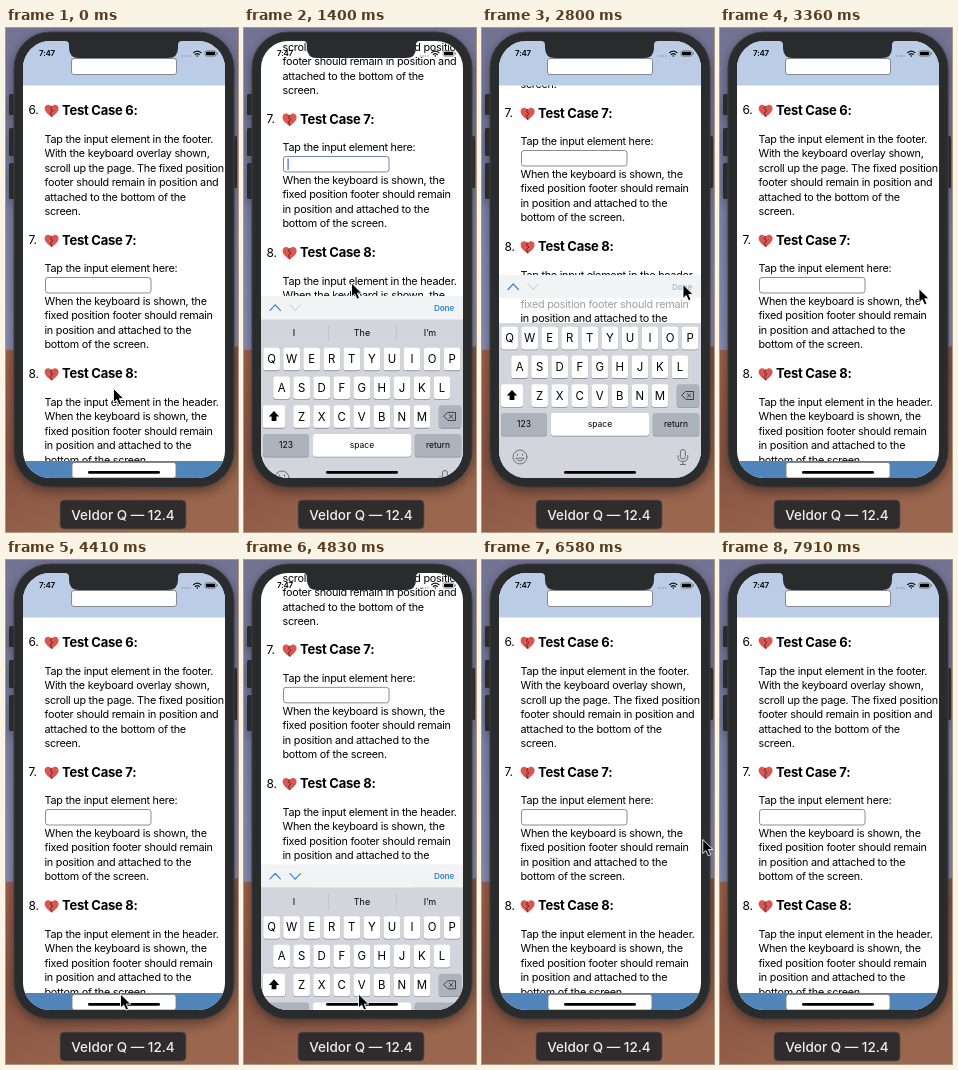
An HTML page for the animation above (7980 ms loop, 232 by 504 pixels).

```html
<!DOCTYPE html>
<html lang="en">
<head>
<meta charset="utf-8">
<title>Fixed footer test</title>
<style>
  html, body { margin: 0; width: 100%; height: 100%; overflow: hidden; background: #7d6f85; }
  svg { display: block; width: 232px; height: 504px; }
  text { font-family: Inter, Roboto, Arial, sans-serif; fill: #000; white-space: pre; }
  .body { font-size: 10.8px; letter-spacing: -.25px; }
  .num { font-size: 12px; letter-spacing: -.2px; }
  .head { font-size: 13px; font-weight: 700; letter-spacing: -.25px; }
  .field { fill: #fff; stroke: #7d8086; stroke-width: .9; }
  .mid { text-anchor: middle; }
  .key { font-size: 11.4px; }
  .small { font-size: 8.5px; }
  .line { fill: none; stroke-width: 1.2; stroke-linecap: round; stroke-linejoin: round; }
  .phone { fill: #2a2b2d; }
  #body { filter: drop-shadow(0 4px 6px rgba(0, 0, 0, .4)); }
</style>
</head>
<body>
<svg id="stage" viewBox="0 0 232 504" xmlns="http://www.w3.org/2000/svg">
  <defs>
    <linearGradient id="sky" x2="0" y2="1">
      <stop offset="0" stop-color="#737393"/>
      <stop offset=".4" stop-color="#8186ab"/>
      <stop offset="1" stop-color="#9296b6"/>
    </linearGradient>
    <linearGradient id="dune" x2=".5" y2="1">
      <stop offset="0" stop-color="#9c614b"/>
      <stop offset=".5" stop-color="#875342"/>
      <stop offset="1" stop-color="#9a664e"/>
    </linearGradient>
    <clipPath id="screen"><rect x="17" y="13" width="202" height="437" rx="27"/></clipPath>
    <g id="heart">
      <path d="M6.6 2.4C4.8-.4 0 .2 0 4.2 0 8 4 10.8 7 13 10 10.8 14 8 14 4.2 14 .2 9.2-.4 7.4 2.4Z" fill="#dd5550"/>
      <path class="line" d="M7 2.2L5.8 4.8 8.4 6.6 5.8 8.8 7.2 12.4" stroke="#5c2a2b" style="stroke-width:1"/>
    </g>
  </defs>

  <rect width="232" height="504" fill="url(#sky)"/>
  <path d="M0 322Q20 320 60 334T232 318V504H0Z" fill="url(#dune)"/>

  <g id="body" class="phone">
    <rect x="3" y="66" width="7" height="21" rx="1.5"/>
    <rect x="3" y="100" width="7" height="28" rx="1.5"/>
    <rect x="3" y="135" width="7" height="36" rx="1.5"/>
    <rect x="226" y="108" width="5" height="52" rx="1.5"/>
    <rect x="8" y="4" width="220" height="455" rx="36" stroke="#3d3f42"/>
  </g>

  <g clip-path="url(#screen)">
    <rect x="17" y="13" width="202" height="437" fill="#fff"/>
    <g id="page"></g>
    <g id="fixed">
      <rect x="17" y="0" width="202" height="57.5" fill="#bacce6"/>
      <rect class="field" x="65.5" y="30.5" width="105" height="16" rx="2.5"/>
      <rect x="17" y="433" width="202" height="18" fill="#4f85bb"/>
      <rect class="field" x="66" y="434.5" width="104" height="15.5" rx="2.5"/>
      <rect id="footCaret" x="69.5" y="437" width="1.2" height="11" fill="#4169d8"/>
    </g>
    <g id="board"></g>
    <g id="status">
      <text x="33" y="28" font-size="8" font-weight="600" letter-spacing="-.2">7:47</text>
      <g fill="#8b8f97">
        <circle cx="176.5" cy="28" r=".7"/><circle cx="179" cy="28" r=".7"/>
        <circle cx="181.5" cy="28" r=".7"/><circle cx="184" cy="28" r=".7"/>
      </g>
      <path class="line" stroke="#111" d="M187.6 24.7Q191.3 21.6 195 24.7M189.3 26.5Q191.3 24.9 193.3 26.5"/>
      <circle cx="191.3" cy="28" r=".8"/>
      <rect x="199" y="22.8" width="11" height="5.4" rx="1.6" fill="none" stroke="#555" stroke-width=".6"/>
      <rect x="200" y="23.8" width="9" height="3.4" rx=".8"/>
      <rect x="210.7" y="24.5" width=".9" height="2" fill="#555"/>
    </g>
    <path class="phone" d="M59 13Q63 13 63 17V20Q63 30 73 30H162Q172 30 172 20V17Q172 13 176 13Z"/>
    <rect x="82" y="443" width="72" height="2.8" rx="1.4"/>
  </g>

  <rect x="54" y="472" width="126" height="29" rx="4" fill="#302c2d" stroke="#5a5252" stroke-width=".8"/>
  <text class="mid" x="117" y="491.5" font-size="13.5" font-weight="500" style="fill:#eee">Veldor Q — 12.4</text>
  <path id="cursor" d="M0 0V14L3.2 11 5.5 16.2 8 15.1 5.8 10.1H10.2Z" stroke="#fff" stroke-width=".9"/>
</svg>

<script>
const LOOP = 7980, STEP = 70, BOARD_H = 204;
const $ = id => document.getElementById(id);

function add(parent, tag, attrs, label) {
  const el = document.createElementNS("http://www.w3.org/2000/svg", tag);
  for (const name in attrs) el.setAttribute(name, attrs[name]);
  if (label) el.textContent = label;
  parent.appendChild(el);
  return el;
}

// Page content
const page = $("page");
const remain = [
  "When the keyboard is shown, the", "fixed position footer should remain",
  "in position and attached to the", "bottom of the screen."
];

function paragraph(y, lines) {
  lines.forEach((line, i) =>
    add(page, "text", { class: "body", x: 38.5, y: y + 3.8 + i * 14.48 }, line));
}

[[6, 82], [7, 212], [8, 345.5]].forEach(([n, y]) => {
  add(page, "text", { class: "num", x: 22.5, y: y + 4.4 }, n + ".");
  add(page, "use", { href: "#heart", transform: `translate(38.6 ${y - 6})` });
  add(page, "text", { class: "head", x: 56, y: y + 4.6 }, `Test Case ${n}:`);
});
paragraph(111, [
  "Tap the input element in the footer.", "With the keyboard overlay shown,",
  "scroll up the page. The fixed position", "footer should remain in position and",
  "attached to the bottom of the", "screen."
]);
paragraph(240, ["Tap the input element here:"]);
const input = add(page, "rect", { class: "field", x: 39.5, y: 249.5, width: 105.5, height: 15.5, rx: 2.5 });
const caret = add(page, "rect", { x: 43.5, y: 251.5, width: 1.2, height: 11.5, fill: "#4169d8" });
paragraph(273, remain);
paragraph(374, ["Tap the input element in the header.", ...remain]);

// Keyboard, drawn in its raised position
const board = $("board");
const blue = "#3583d6", grey = "#adb3bd";

function key(cx, cy, w, label, fill = "#fff", cls = "key") {
  const box = { x: cx - w / 2, y: cy - 11.2, width: w, height: 22.6, rx: 2.7 };
  add(board, "rect", { ...box, y: box.y + .8, fill: "#8b8e94" });
  add(board, "rect", { ...box, fill });
  if (label) add(board, "text", { class: "mid " + cls, x: cx, y: cy + (cls === "key" ? 4.1 : 3.1) }, label);
}

add(board, "rect", { x: 17, y: 247, width: 202, height: 23.5, fill: "#f2f3f5" });
add(board, "path", { class: "line", d: "M26 261.5L31.2 256 36.4 261.5", stroke: blue });
const next = add(board, "path", { class: "line", d: "M46 256.2L51.2 261.7 56.4 256.2" });
const done = add(board, "text", { x: 190, y: 262, "font-size": 8.2, "font-weight": 600, style: `fill:${blue}`, "letter-spacing": -.15 }, "Done");

const veil = add(board, "rect", { x: 17, y: 270.5, width: 202, height: 12.5, fill: "#fff", opacity: .62 });
const predict = add(board, "g", {});
add(predict, "rect", { x: 17, y: 270.5, width: 202, height: 25, fill: "#d2d5db" });
[["I", 50], ["The", 118], ["I’m", 186]].forEach(([word, x]) =>
  add(predict, "text", { class: "mid", "font-size": 9, x, y: 287.5 }, word));
[84, 152].forEach(x => add(predict, "rect", { x, y: 276, width: .6, height: 16, fill: "#b9bdc5" }));

add(board, "rect", { x: 17, y: 295, width: 202, height: 156, fill: "#d2d5db" });
[["QWERTYUIOP", 27.6, 310], ["ASDFGHJKL", 37.6, 338.7], ["ZXCVBNM", 57.6, 367.5]].forEach(
  ([row, x, y]) => [...row].forEach((c, i) => key(x + i * 20.05, y, 16.7, c)));
key(30, 367.5, 22.5);
add(board, "path", { d: "M30 362L35.2 367.6H32.4V372H27.6V367.6H24.8Z" });
key(206, 367.5, 22.5, "", grey);
add(board, "path", { class: "line", d: "M204 363.5H211.5V371.5H204L200 367.5ZM205.3 365.7L208.9 369.3M208.9 365.7L205.3 369.3", stroke: "#222", style: "stroke-width:.8" });
key(42, 396.3, 46, "123", grey, "small");
key(118, 396.3, 98, "space", "#fff", "small");
key(194, 396.3, 46.5, "return", grey, "small");

const icon = { class: "line", stroke: "#6b7077", style: "stroke-width:1" };
add(board, "circle", { ...icon, cx: 38, cy: 429, r: 7 });
add(board, "path", { ...icon, d: "M35.5 426V427.4M40.5 426V427.4M34 430.5Q38 436 42 430.5Z" });
add(board, "rect", { ...icon, x: 198.4, y: 421.5, width: 5, height: 9.5, rx: 2.5 });
add(board, "path", { ...icon, d: "M196 427.5V429Q196 433.4 200.9 433.4T205.8 429V427.5M200.9 433.4V436.5M198.4 436.5H203.4" });

// Motion
const easeOut = p => 1 - (1 - p) ** 2;
const easeInOut = p => p * p * (3 - 2 * p);

function track(keys, t, ease) {
  let i = 0;
  while (i < keys.length - 1 && t >= keys[i + 1][0]) i++;
  const a = keys[i], b = keys[i + 1];
  if (!b || t <= a[0]) return a.slice(1);
  const p = ease((t - a[0]) / (b[0] - a[0]));
  return a.slice(1).map((v, n) => v + (b[n + 1] - v) * p);
}

const scrollKeys = [
  [0, 0], [1190, 0], [1458, -127], [2800, -127], [3150, 0],
  [4690, 0], [5072, -204], [5810, -204], [6160, 0]
];
const boardKeys = [
  [0, BOARD_H], [1190, BOARD_H], [1499, 0], [2800, 0], [3120, BOARD_H],
  [4690, BOARD_H], [4988, 0], [5810, 0], [6130, BOARD_H]
];
const cursorKeys = [
  [0, 107.5, 360.5], [350, 107.5, 360.5], [980, 107.5, 255], [1680, 107.5, 255], [2450, 201, 256.5],
  [3290, 201, 256.5], [4060, 114.5, 434], [4900, 114.5, 434], [5530, 201.5, 259],
  [6300, 201.5, 259], [6860, 240, 300]
];
const focusSpans = [[1190, 2730], [4690, 5740]];

const move = (el, x, y) => el.setAttribute("transform", `translate(${x} ${y})`);
const show = (el, on) => el.setAttribute("visibility", on ? "visible" : "hidden");

function draw(t) {
  const [scroll] = track(scrollKeys, t, easeOut);
  const [drop] = track(boardKeys, t, easeOut);
  const [x, y] = track(cursorKeys, t, easeInOut);
  const focus = focusSpans.findIndex(([from, to]) => t >= from && t < to);
  const focused = focus >= 0;
  const blink = focused && (t - focusSpans[focus][0]) % 1000 < 500;

  move(page, 0, scroll);
  move($("fixed"), 0, focused ? scroll : 0);
  move(board, 0, drop);
  move($("cursor"), x, y);

  show(board, drop < BOARD_H);
  show(caret, blink && focus === 0);
  show($("footCaret"), blink && focus === 1);
  show(predict, focused);
  show(veil, !focused && drop < BOARD_H);
  input.style.stroke = focus === 0 ? "#6474a6" : "";
  next.setAttribute("stroke", t > 4000 ? blue : "#d3d6da");
  done.setAttribute("opacity", focused ? 1 : .45);
}

const start = performance.now();
function tick() {
  const t = (performance.now() - start) % LOOP;
  draw(Math.floor(t / STEP) * STEP);
  requestAnimationFrame(tick);
}
tick();
</script>
</body>
</html>
```
